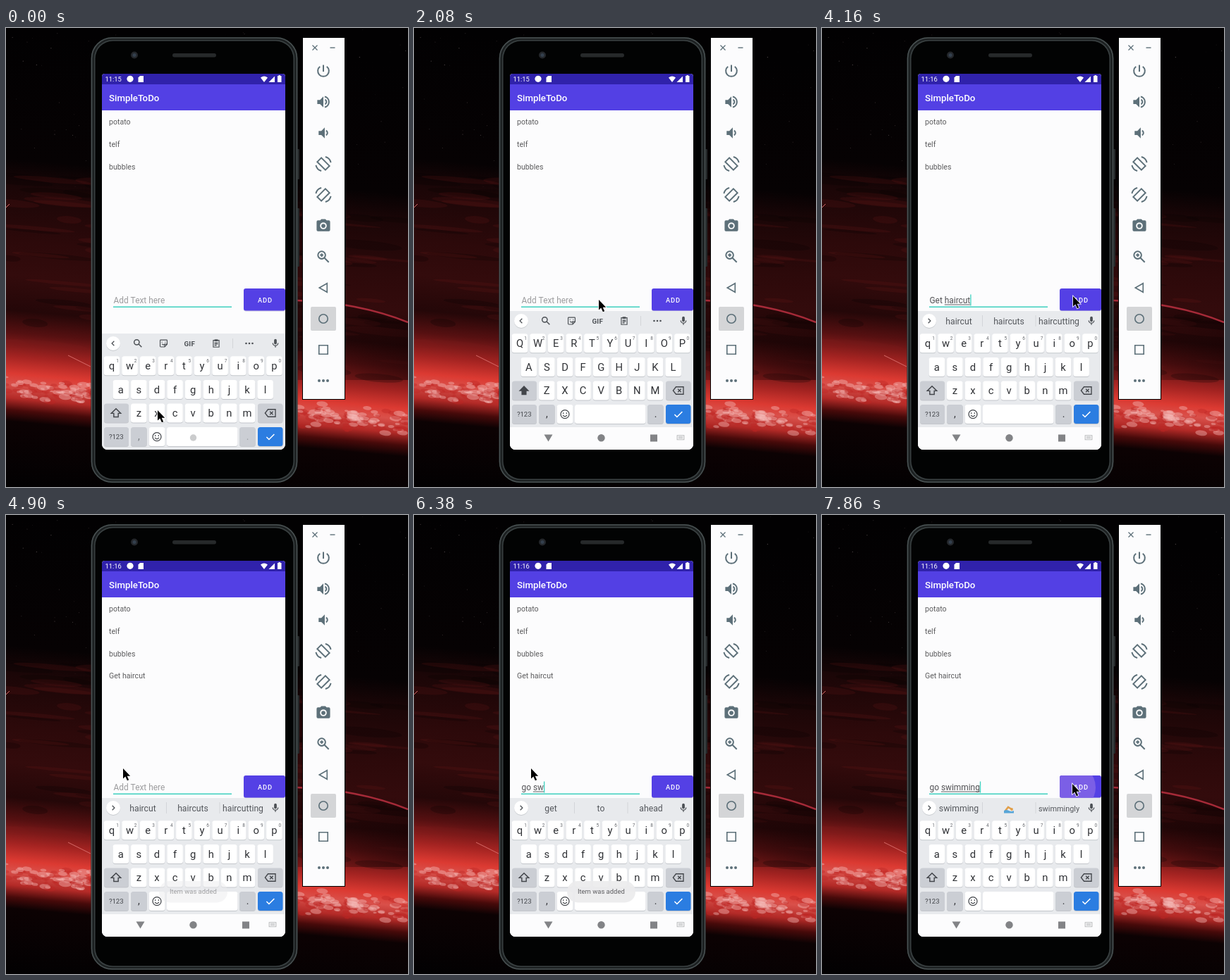
Write an HTML page with a canvas that moves like this. It is 570x652 px and loops after 8000 ms.

```html
<!DOCTYPE html>
<html lang="en">
<head>
<meta charset="utf-8">
<title>To-do list in a phone emulator</title>
<style>
html, body { margin: 0; width: 100%; height: 100%; overflow: hidden; background: #000; }
canvas { display: block; }
</style>
</head>
<body>
<canvas id="stage" width="570" height="652"></canvas>
<script>
const W = 570, H = 652, LOOP = 8000, STEP = 148.4;
const stage = document.getElementById('stage');
const backdrop = document.createElement('canvas');
backdrop.width = W;
backdrop.height = H;
let g = backdrop.getContext('2d');

const FONT = 'Roboto, Arial, sans-serif';
const SLATE = '#5d7079', DARK = '#4c5055', TEAL = '#3ed0bf', PURPLE = '#5440e5';

// Icons on a 24 unit grid: [filled path, stroked path]
const ICONS = {
  power: ['', 'M12 3v10M7 5.5A8.2 8.2 0 1 0 17 5.5'],
  volUp: ['M3 9v6h4l5 5V4L7 9z', 'M14.5 8.5a4 4 0 0 1 0 7M14 4.2a8 8 0 0 1 0 15.6'],
  volDown: ['M5 9v6h4l5 5V4L9 9z', 'M16 8.5a4 4 0 0 1 0 7'],
  rotate: ['', 'M9 3l12 12-6 6L3 9zM1 14a11 11 0 0 0 8 8.5M23 10a11 11 0 0 0-8-8.5'],
  camera: ['M9 2 7.2 4H4a2 2 0 0 0-2 2v12a2 2 0 0 0 2 2h16a2 2 0 0 0 2-2V6a2 2 0 0 0-2-2h-3.2L15 2zM12 7a5 5 0 1 1 0 10 5 5 0 0 1 0-10zM12 9a3 3 0 1 1 0 6 3 3 0 0 1 0-6z', ''],
  zoom: ['', 'M15 9.5a5.5 5.5 0 1 1-11 0 5.5 5.5 0 0 1 11 0M14 14l6 6M9.5 7v5M7 9.5h5'],
  back: ['', 'M17.5 5.5 6 12l11.5 6.5z'],
  home: ['', 'M18.5 12a6.5 6.5 0 1 1-13 0 6.5 6.5 0 0 1 13 0'],
  recent: ['', 'M5.5 5.5h13v13h-13z'],
  close: ['', 'M5 5l14 14M19 5 5 19'],
  minus: ['', 'M5 12h14'],
  search: ['', 'M15 9.5a5.5 5.5 0 1 1-11 0 5.5 5.5 0 0 1 11 0M14 14l6 6'],
  sticker: ['', 'M5 3.5h14q1.500 0 1.500 1.500v9l-6 6.500H5q-1.500 0-1.500-1.500V5q0-1.500 1.500-1.500M20 14h-5.500v6M8 8v2M16 8v2M8 13q3 4 6 1'],
  clip: ['M8 2h8v5H8z', 'M5 4.500h14V21H5zM8 10.500h8M8 13.500h8M8 17h5'],
  mic: ['M12 2a3 3 0 0 1 3 3v6a3 3 0 0 1-6 0V5a3 3 0 0 1 3-3z', 'M6 11a6 6 0 0 0 12 0M12 17v4'],
  shift: ['', 'M12 4 3.500 12.500H8V19h8v-6.500h4.500z'],
  shiftOn: ['M12 3 2.500 13H7.500v7h9v-7h5z', ''],
  erase: ['', 'M8 5h14v14H8L2.500 12zM11.500 9l6 6M17.500 9l-6 6'],
  smile: ['', 'M21 12a9 9 0 1 1-18 0 9 9 0 0 1 18 0M8.500 8.500v2.500M15.500 8.500v2.500M7.500 14q4.500 5.500 9 0'],
  check: ['', 'M4.500 12.500l5 5L20 7'],
  left: ['', 'M14.500 6l-6 6 6 6'],
  right: ['', 'M9.500 6l6 6-6 6'],
  keys: ['', 'M3 6h18v11H3zM6 9.500h12M6 13h12']
};

function icon(name, x, y, size, color, weight = 2, flip = 1) {
  const [solid, line] = ICONS[name], k = size / 24;
  g.save();
  g.translate(x, y);
  g.scale(k * flip, k);
  g.translate(-12, -12);
  g.fillStyle = g.strokeStyle = color;
  g.lineWidth = weight;
  if (solid) g.fill(new Path2D(solid), 'evenodd');
  if (line) g.stroke(new Path2D(line));
  g.restore();
}

function box(x, y, w, h, color, r = 0) {
  g.fillStyle = color;
  g.beginPath();
  g.roundRect(x, y, w, h, r);
  g.fill();
}

function disc(x, y, r, color) {
  g.fillStyle = color;
  g.beginPath();
  g.arc(x, y, r, 0, 7);
  g.fill();
}

function shape(path, color) {
  g.fillStyle = color;
  g.fill(new Path2D(path));
}

function dots(x, y, gap, r, color) {
  for (let i = -1; i < 2; i++) disc(x + i * gap, y, r, color);
}

function label(str, x, y, size, color, align = 'left', weight = 400, spacing = 0) {
  g.font = `${weight} ${size}px ${FONT}`;
  g.letterSpacing = spacing + 'px';
  g.textAlign = align;
  g.fillStyle = color;
  g.fillText(str, x, y);
}

let seed = 11;
function rnd(a = 0, b = 1) {
  seed = (seed * 16807) % 2147483647;
  return a + (b - a) * seed / 2147483647;
}

function puff(x, y, rx, ry, color) {
  g.fillStyle = color;
  g.beginPath();
  g.ellipse(x, y, rx, ry, 0, 0, 7);
  g.fill();
}

function drawSky() {
  g.save();
  g.transform(1, 0.09, 0, 1, 0, 0);
  const sky = g.createLinearGradient(0, 0, 0, H);
  [[0, '#020102'], [185, '#060203'], [225, '#1b0607'], [300, '#2c090a'], [350, '#330b0c'],
   [400, '#240708'], [432, '#561011'], [465, '#a32321'], [490, '#dc3a32'], [505, '#d9504a'],
   [525, '#b32a27'], [542, '#470a0a'], [558, '#0c0203'], [H, '#020102']]
    .forEach(([y, c]) => sky.addColorStop(y / H, c));
  g.fillStyle = sky;
  g.fillRect(0, -60, W, H + 60);
  for (let i = 0; i < 110; i++) {
    const dark = rnd() < 0.55;
    puff(rnd(0, W), rnd(200, 450), rnd(15, 60), rnd(1.5, 7), dark ? 'rgba(8,1,2,.24)' : 'rgba(130,28,28,.15)');
  }
  for (let i = 0; i < 420; i++) {
    const y = 511 + rnd(-10, 10) + rnd(-8, 8), r = rnd(1.5, 6);
    puff(rnd(0, W), y, r * 1.5, r * 0.7, rnd() < 0.55 ? 'rgba(246,188,186,.42)' : 'rgba(190,38,36,.4)');
  }
  g.restore();
  const dusk = g.createLinearGradient(480, 0, W, 0);
  dusk.addColorStop(0, 'rgba(20,2,3,.25)');
  dusk.addColorStop(1, 'rgba(20,2,3,.5)');
  g.fillStyle = dusk;
  g.fill(new Path2D('M413 387Q500 390 570 418V500H413z'));
  g.strokeStyle = '#a52a38';
  g.lineWidth = 2.5;
  g.stroke(new Path2D('M413 387Q500 390 570 418'));
  g.strokeStyle = '#d76a68';
  g.lineWidth = 1;
  g.stroke(new Path2D('M88 465l32 16M0 255l5-5'));
  for (let i = 0; i < 90; i++) {
    disc(rnd(0, W), rnd(0, 230), rnd(0.3, 0.7), `rgba(190,170,170,${rnd(0.1, 0.5)})`);
  }
}

function drawPhone() {
  box(412, 172, 4, 43, '#25292a', 1);
  box(412, 256, 4, 83, '#25292a', 1);
  box(120.500, 13, 293, 633, '#1c2021', 30);
  g.lineWidth = 1.500;
  g.strokeStyle = '#4a5253';
  g.beginPath();
  g.roundRect(121.500, 14, 291, 631, 29);
  g.stroke();
  box(125, 17, 284, 625, '#3a4142', 26);
  box(126.500, 18.500, 281, 622, '#020303', 25);
  disc(182, 38.500, 5, '#24272b');
  disc(182, 38.500, 2.500, '#34404e');
  box(236, 36, 62, 5.500, '#26292a', 2.700);
}

function drawPanel() {
  box(420, 13, 61, 515, '#000');
  box(421, 14, 59, 513, '#fcfcfd');
  icon('close', 438, 28, 12, SLATE, 2.600);
  icon('minus', 463, 28, 12, SLATE, 2.800);
  box(432, 396, 36, 34, '#d4d5d7', 2);
  ['power', 'volUp', 'volDown', 'rotate', 'rotate', 'camera', 'zoom', 'back', 'home', 'recent']
    .forEach((name, i) => icon(name, 450, 61 + 44 * i, 23, SLATE, i > 6 ? 1.700 : 2.100, i === 4 ? -1 : 1));
  dots(450, 501, 6, 2, SLATE);
}

// [step, field text, suggestions if they change]
const TYPING = [
  [0, '', null],
  [15, 'G'],
  [16, 'Ge', ['Good', 'Get', 'Great']],
  [17, 'Get', ['Ge', 'Get', 'Getting']],
  [18, 'Get '],
  [19, 'Get h', ['a', 'the', 'it']],
  [20, 'Get ha', ['home', 'here', 'him']],
  [21, 'Get hair', ['have', 'hair', 'had']],
  [22, 'Get hairc', ['hair', 'haircut', 'hairy']],
  [23, 'Get haircu'],
  [24, 'Get haircut', ['haircut', 'haircuts', 'haircutting']],
  [30, ''],
  [38, 'g', ['I', 'the', 'and']],
  [40, 'go', ['good', 'get', 'go']],
  [41, 'go '],
  [42, 'go s', ['get', 'to', 'ahead']],
  [43, 'go sw'],
  [44, 'go swi', ['see', 'sw', 'swim']],
  [45, 'go swim', ['swi', 'swim', 'swimming']],
  [46, 'go swimm'],
  [47, 'go swimmi', ['swim', 'swimming', 'swims']],
  [48, 'go swimmin'],
  [49, 'go swimming', ['swimming', '~', 'swimmingly']]
];

function typedAt(n) {
  let text = '', words = null;
  for (const [at, str, list] of TYPING) {
    if (at > n) break;
    text = str;
    if (list) words = list;
  }
  return { text, words };
}

// Pointer moves: [start, end, x, y, lift]
const MOVES = [[3, 6, 262, 386, 0], [25, 28, 356, 381, 10], [30, 33, 166, 360, 0], [50, 52, 355, 382, 12]];

function pointerAt(n) {
  let x = 215, y = 543;
  for (const [a, b, tx, ty, lift] of MOVES) {
    if (n <= a) break;
    const p = Math.min(1, (n - a) / (b - a)), e = p * p * (3 - 2 * p);
    x += (tx - x) * e;
    y += (ty - y) * e - lift * Math.sin(Math.PI * p);
  }
  return [x, y];
}

const within = (n, a, b) => n >= a && n < b;

function drawBars(n) {
  box(136, 65, 260, 534, '#fcfcfd');
  box(136, 65, 260, 15, '#3022ab');
  box(136, 80, 260, 37, '#5340e4');
  label(n < 18 ? '11:15' : '11:16', 140.500, 75.800, 9.400, '#fff');
  disc(176, 72.300, 4.600, '#fff');
  shape('M190 68h5v9h-7.500v-6.500z', '#fff');
  shape('M366 77l-5-6.500q5-4 10 0z', '#fff');
  shape('M372.500 77h8.500v-8.500z', '#fff');
  shape('M386.500 68v-1h2.500v1h1.500v9h-5.500v-9z', '#fff');
  label('SimpleToDo', 146, 104, 13.250, '#fff', 'left', 500);
}

function drawForm(n, text) {
  const items = ['potato', 'telf', 'bubbles'];
  if (n >= 30) items.push('Get haircut');
  items.forEach((s, i) => label(s, 146, 137 + 31.800 * i, 10.600, '#5c5c5e'));

  label(text || 'Add Text here', 152.500, 391, 11.900, text ? '#505053' : '#9c9c9e');
  box(152, 395.600, 168, 1.400, TEAL);
  const wide = g.measureText(text).width;
  const word = text.slice(text.lastIndexOf(' ') + 1);
  if (word) {
    const w = g.measureText(word).width;
    box(152.500 + wide - w, 392.500, w, 0.900, '#606063');
  }
  const blink = within(n, 2, 5) || within(n, 9, 12) || within(n, 30, 33) || n === 37;
  if (text || blink) box(152.500 + wide, 378.500, 1.300, 16, TEAL);

  box(337, 371, 59, 31.500, '#cfccdf', 3);
  box(337, 370, 59, 31.500, PURPLE, 3);
  const ripple = { 29: 36, 30: 62, 31: 62, 53: 33 }[n];
  if (ripple) {
    g.save();
    g.beginPath();
    g.roundRect(337, 370, 59, 31.500, 3);
    g.clip();
    disc(355, 387, ripple, n === 31 ? '#6750e5' : '#7b5fe6');
    g.restore();
  }
  label('ADD', 357, 389.600, 9.300, '#fff', 'left', 500, 0.830);
}

function drawSwimmer(x, y) {
  g.lineCap = 'round';
  g.lineWidth = 2.600;
  g.strokeStyle = '#e2a04a';
  g.stroke(new Path2D(`M${x - 5} ${y + 2}l4-5 5 3`));
  disc(x + 4, y, 1.900, '#e2a04a');
  g.lineCap = 'butt';
  shape(`M${x - 7} ${y + 2}q3.500-2 7 0t7 0v3.500h-14z`, '#57a5d8');
}

function drawStrip(words, y) {
  disc(152, y + 1, 10, '#c9ccd0');
  disc(152, y, 10, '#fff');
  icon(words ? 'right' : 'left', 152, y, 13, DARK, 2.300);
  icon('mic', 382, y, 15, DARK);
  if (!words) {
    icon('search', 187, y, 16, DARK, 2.200);
    icon('sticker', 223.500, y, 14, DARK);
    label('GIF', 260.300, y + 3.700, 9.800, DARK, 'center', 700, 0.300);
    icon('clip', 298, y, 14, DARK);
    box(321, y - 7, 1, 14, '#d3d5d9');
    dots(345, y, 4.500, 1.300, DARK);
    return;
  }
  box(227, y - 8, 1, 16, '#d3d5d9');
  box(302.500, y - 8, 1, 16, '#d3d5d9');
  words.forEach((s, i) => {
    const x = 194 + 71 * i;
    if (s === '~') drawSwimmer(x, y + 2);
    else label(s, x, y + 5, s === 'swimmingly' ? 10.900 : 12.200, '#54575c', 'center');
  });
}

function keycap(x, y, w, color) {
  box(x, y + 1, w, 27, '#c3c6cb', 3.500);
  box(x, y, w, 27, color, 3.500);
}

function drawKeyboard(n, words) {
  const dy = n < 1 ? 32 : 0, upper = within(n, 14, 16), GREY = '#cbced4';
  box(136, 402 + dy, 260, 197, '#e8eaed');
  drawStrip(words, 416 + dy);
  const rows = [['qwertyuiop', 150], ['asdfghjkl', 162.800], ['zxcvbnm', 188.300]];
  rows.forEach(([chars, x0], r) => [...chars].forEach((c, i) => {
    const x = x0 + 25.600 * i, y = 434.300 + 33.600 * r + dy;
    keycap(x - 11.300, y, 22.600, '#fff');
    label(upper ? c.toUpperCase() : c, x, y + 18.800, 14.800, '#303236', 'center');
    if (!r) label((i + 1) % 10, x + 8, y + 8.500, 6.500, '#66696e', 'center');
  }));
  const y3 = 501.500 + dy, y4 = 535.100 + dy;
  keycap(139, y3, 35, GREY);
  icon(upper ? 'shiftOn' : 'shift', 156, y3 + 13.500, 19, '#43464b', 1.800);
  keycap(357, y3, 35.500, GREY);
  icon('erase', 374.500, y3 + 13.500, 18, '#43464b', 1.800);
  keycap(139, y4, 35, GREY);
  label('?123', 156.300, y4 + 17, 9.600, '#46494e', 'center');
  keycap(177, y4, 22.800, GREY);
  label(',', 188.500, y4 + 18, 14, dy ? '#777a7f' : '#303236', 'center');
  keycap(202.700, y4, 22.800, '#fff');
  icon('smile', 214, y4 + 13.500, 16, '#43464b', 1.900);
  keycap(228, y4, 100.500, '#fff');
  keycap(331, y4, 22.800, GREY);
  label('.', 342.500, y4 + 18, 14, dy ? '#9b9ea3' : '#303236', 'center');
  keycap(357, y4, 35.500, '#2b7de1');
  icon('check', 374.700, y4 + 13.500, 17, '#fff', 2.200);

  if (dy) {
    disc(265.500, 582, 4.700, '#cbcccd');
    return;
  }
  box(136, 567, 260, 32, '#fcfcfd');
  shape('M184.500 577.500h12l-6 10z', '#828386');
  disc(265.500, 582.300, 5.200, '#828386');
  box(335, 577.500, 10, 10, '#828386');
  icon('keys', 378, 582, 13, '#b9babc', 1.900);
}

function drawToast(n) {
  const alpha = within(n, 34, 46) ? 1 : { 32: 0.2, 33: 0.55, 46: 0.5 }[n];
  if (!alpha) return;
  g.globalAlpha = alpha * 0.92;
  box(217, 520, 97, 30.500, '#ececed', 15);
  g.globalAlpha = alpha;
  label('Item was added', 265.300, 538.400, 9.450, '#5e5e61', 'center');
  g.globalAlpha = 1;
}

function drawPointer(n) {
  const [x, y] = pointerAt(n);
  g.save();
  g.translate(x, y);
  const arrow = new Path2D('M0 0V14.500l3.300-3 2.600 5.700 2.300-1-2.500-5.500H10.200z');
  g.strokeStyle = '#fff';
  g.lineWidth = 1.600;
  g.stroke(arrow);
  g.fillStyle = '#000';
  g.fill(arrow);
  g.restore();
}

drawSky();
drawPhone();
drawPanel();
g = stage.getContext('2d');

function render(ms) {
  const n = Math.floor((ms % LOOP + 6) / STEP);
  const { text, words } = typedAt(n);
  g.drawImage(backdrop, 0, 0);
  g.save();
  g.beginPath();
  g.roundRect(136, 65, 260, 534, [4, 4, 8, 8]);
  g.clip();
  drawBars(n);
  drawForm(n, text);
  drawKeyboard(n, words);
  drawToast(n);
  g.restore();
  drawPointer(n);
}

const start = performance.now();
(function tick() {
  render(performance.now() - start);
  requestAnimationFrame(tick);
})();
</script>
</body>
</html>
```
